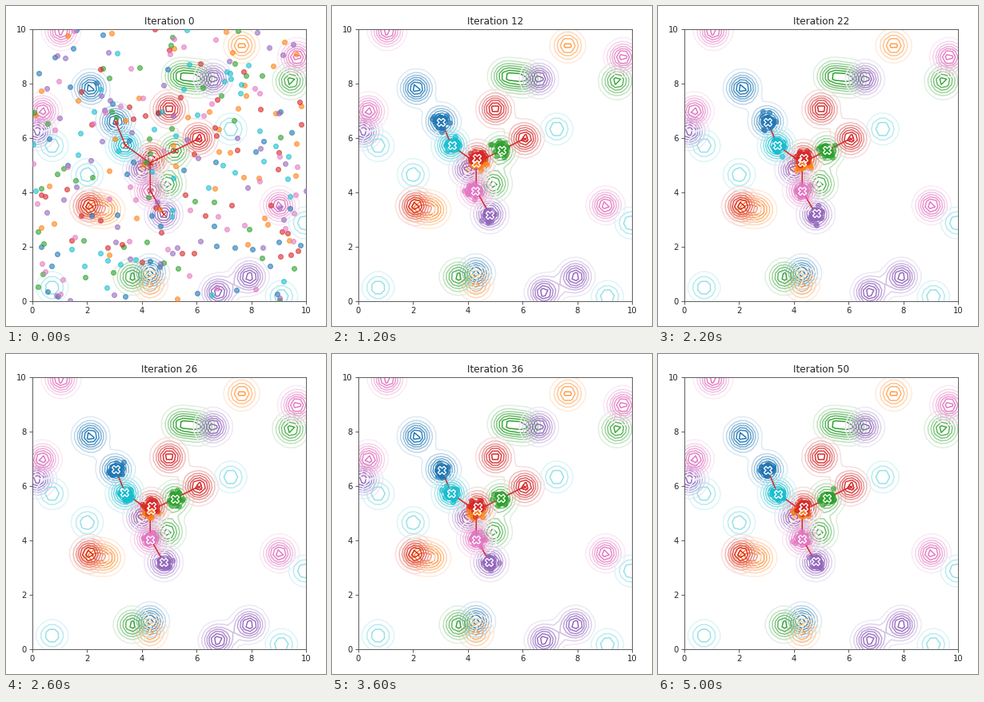
Recreate the animation shown at these times as a matplotlib script. Size 400x400 px, loop 5100 ms.

```python
import matplotlib.pyplot as plt
import numpy as np
from matplotlib.animation import FuncAnimation
from matplotlib.colors import LinearSegmentedColormap

FRAMES = 51
INTERVAL = 100
PER_SWARM = 44
SETTLED = 7  # iteration at which the swarms have gathered
SIGMA = 0.35  # width of every hill

# Peaks of each swarm's landscape; the swarm ends on the first one.
HILLS = {
    "blue": [(3.04, 6.6), (2.12, 7.83), (4.29, 1.02)],
    "orange": [(4.3, 5.08), (7.65, 9.4), (2.15, 3.45), (2.72, 3.36), (4.3, 0.63)],
    "green": [(5.2, 5.54), (5.4, 8.27), (6.12, 8.18), (9.45, 8.1),
              (4.93, 4.3), (3.65, 0.9)],
    "red": [(4.34, 5.24), (6.08, 5.98), (5.0, 7.07), (2.08, 3.5)],
    "purple": [(4.8, 3.2), (0.17, 6.25), (6.6, 8.17), (4.02, 4.85),
               (7.93, 0.9), (6.78, 0.33)],
    "pink": [(4.31, 4.06), (1.05, 9.93), (9.67, 8.97), (0.37, 6.98), (9.03, 3.52)],
    "cyan": [(3.4, 5.73), (3.36, 5.73), (0.72, 5.72), (0.72, 0.5), (2.0, 4.65),
             (7.25, 6.33), (9.1, 0.17), (9.95, 2.88)],
}
GOAL = {name: np.array(hills[0]) for name, hills in HILLS.items()}

# Side from which each swarm closes in on its goal, in degrees.
APPROACH = dict(blue=175, orange=0, green=65, red=75, purple=220, pink=160, cyan=30)

rng = np.random.default_rng(11)
steps = np.arange(FRAMES)


def landscape(hills, grid_x, grid_y):
    return sum(np.exp(-((grid_x - x) ** 2 + (grid_y - y) ** 2) / (2 * SIGMA ** 2))
               for x, y in hills)


def drift(name, distance):
    """Hold beside the goal until gathered, then ease onto it."""
    angle = np.radians(APPROACH[name])
    offset = distance * np.array([np.cos(angle), np.sin(angle)])
    ease = 0.72 ** np.maximum(steps - SETTLED, 0)
    return GOAL[name] + offset * ease[:, None]


def wander(shape, scale, keep=0.5):
    """Correlated jitter, starting from rest."""
    path = np.zeros((FRAMES, *shape))
    for k in steps[1:]:
        path[k] = keep * path[k - 1] + rng.normal(0, scale, shape)
    return path


def swarm_path(name):
    start = rng.uniform(0, 10, (PER_SWARM, 2))
    centre = drift(name, 0.34)[:, None]
    decay = 0.55 ** steps[:, None, None]
    return centre + (start - centre[0]) * decay + wander((PER_SWARM, 2), 0.1)


def draw_contours(hills, color):
    axis = np.linspace(0, 10, 50)
    grid_x, grid_y = np.meshgrid(axis, axis)
    heights = landscape(hills, grid_x, grid_y)
    top = heights.max()
    cmap = LinearSegmentedColormap.from_list(color, ["white", color])
    ax.contour(grid_x, grid_y, heights, levels=top * 0.13 * np.arange(1, 8),
               cmap=cmap, vmin=0, vmax=top * 0.85, linewidths=1.35, zorder=1)


plt.rcParams.update({"font.size": 9, "axes.titlesize": 10.8, "axes.titlepad": 5.4,
                     "xtick.major.size": 3.2, "ytick.major.size": 3.2,
                     "xtick.major.pad": 3.2, "ytick.major.pad": 3.2})
fig = plt.figure(figsize=(5, 5), dpi=80, facecolor="white")
ax = fig.add_axes([33 / 400, 31 / 400, 342 / 400, 340 / 400])
ax.set(xlim=(0, 10), ylim=(0, 10))
ax.tick_params(color="0.3", labelcolor="0.15")
ax.spines[:].set_color("0.3")
title = ax.set_title("Iteration 0", color="0.15")

groups = []
for name, hills in HILLS.items():
    color = f"tab:{name}"
    draw_contours(hills, color)
    path = swarm_path(name)
    best_path = drift(name, 0.16) + wander((2,), 0.015)
    dots = ax.scatter(*path[0].T, s=29, color=color, alpha=0.6, zorder=3)
    best = ax.scatter(*best_path[0], marker="X", s=81, color=color,
                      edgecolors="white", linewidths=1.2, zorder=4)
    groups.append((dots, path, best, best_path))

hub, tip = GOAL["orange"], HILLS["red"][1]
for branch in ([GOAL["blue"], GOAL["cyan"], hub, GOAL["green"], tip],
               [hub, GOAL["pink"], GOAL["purple"]]):
    ax.plot(*np.transpose(branch), color="tab:red", marker="x", ms=5.4,
            lw=1.35, zorder=2.5)


def update(k):
    title.set_text(f"Iteration {k}")
    for dots, path, best, best_path in groups:
        dots.set_offsets(path[k])
        best.set_offsets(best_path[k])
        best.set_visible(k > 0)
    return []


anim = FuncAnimation(fig, update, frames=FRAMES, interval=INTERVAL,
                     repeat=True, repeat_delay=0)
plt.show()
```
